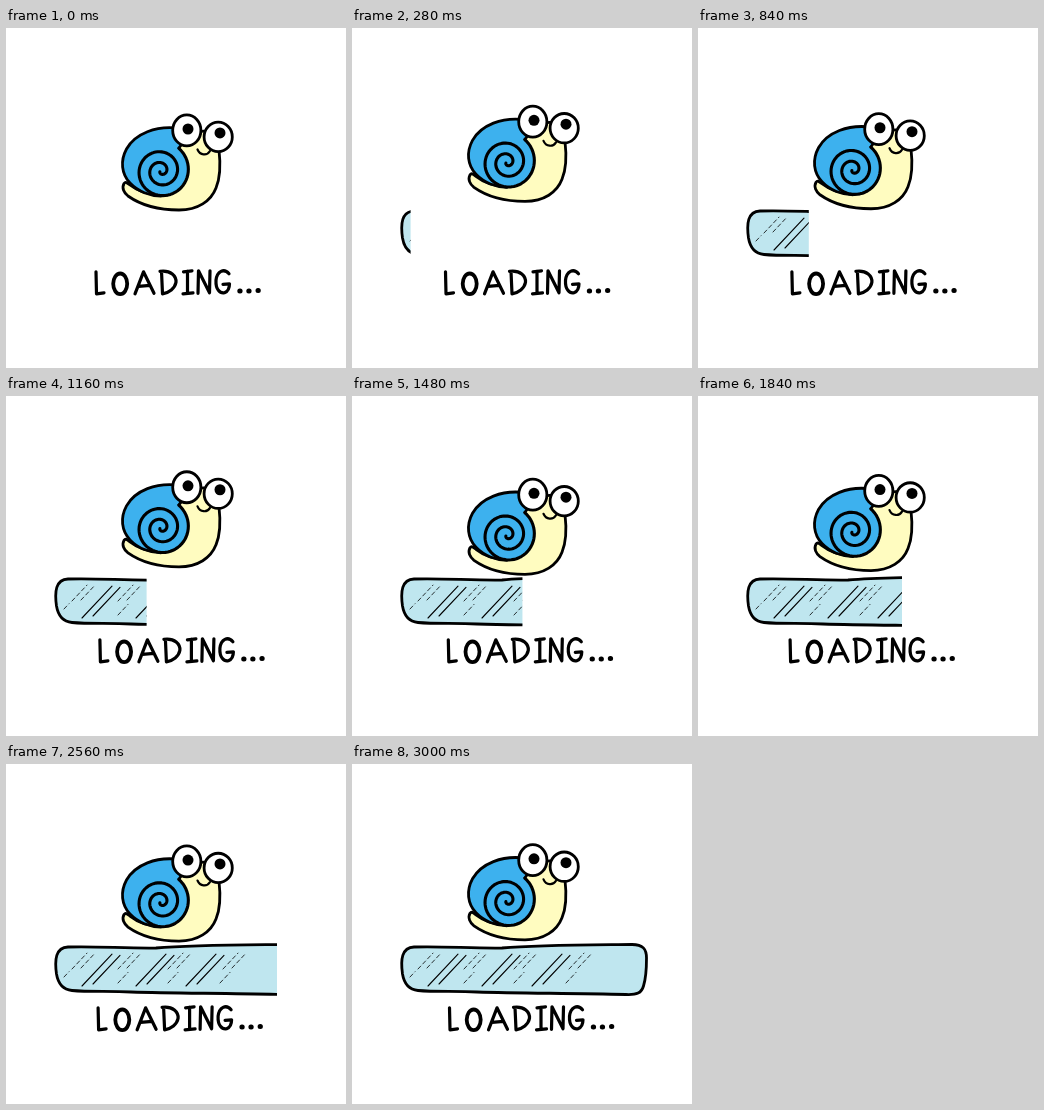
Write an HTML page that moves like this. It is 340x340 px and loops after 3040 ms.

```html
<!DOCTYPE html>
<html lang="en">
<head>
<meta charset="utf-8">
<title>Loading</title>
<style>
  html, body { margin: 0; width: 100%; height: 100%; overflow: hidden; background: #fff; }
  svg { display: block; width: 100vw; height: 100vh; }
  .ink { fill: none; stroke: #000; stroke-width: 2.8; stroke-linecap: round; stroke-linejoin: round; }
  .body { fill: #fffcc0; }
  .shell { fill: #3db1ee; }
  .eye { fill: #fff; }
  .glass { fill: #bfe6ef; }
  .fine { stroke-width: 1.1; }
  .dash { stroke-width: .8; stroke-dasharray: 4 3; }
  .word { stroke-width: 3.2; }
  .bold { stroke-width: 3.8; }
  .dots { stroke-width: 5; }
  .smile { stroke-width: 2.2; }
  #spiral { stroke-width: 3.1; }
</style>
</head>
<body>
<svg viewBox="0 0 340 340" role="img" aria-label="LOADING...">
  <defs>
    <clipPath id="reveal"><rect id="edge" y="170" width="0" height="70"/></clipPath>
  </defs>

  <g clip-path="url(#reveal)">
    <path class="ink glass" d="M62 183C90 182 120 184.500 150 184C185 181 235 181 280 180.500
      C291 180.500 294.500 185 294.500 194C294.500 204 294 214 291.500 222C289.500 229 285 231 274 230.500
      C220 229 170 229.500 125 228C103 227 82 228 66 226.500C56 225.500 52 219 50.500 210
      C48.500 196 49.500 183.500 62 183Z"/>
    <g id="shine"></g>
  </g>

  <g id="snail">
    <path class="ink body" d="M118 155.500C115.500 160 118 165 122 168C134 176.500 152 182 173 182
      C192 182 205 173 210 160C215 148 214.500 135 213 122L206 107C202 103 196 102 190 105L170 117
      L160 166C145 168 133 164 124 157C121 154.500 119.500 153.500 118 155.500Z"/>
    <path class="shell" d="M174 100.500C150 97 129 106 120.500 121C114 133 115.500 146 124 155
      C132 163.500 144 168 155 168C173 167 183 156 182 142C181.500 130 178 124 173 120L178 112Z"/>
    <path class="ink" d="M174 100.500C150 97 129 106 120.500 121C114 133 115.500 146 124 155
      C132 163.500 144 168 155 168M173 120L178 113"/>
    <path class="ink" id="spiral"/>
    <g id="eyes"></g>
    <path class="ink smile" d="M191.500 121.500C194 127.500 201 128 204 123"/>
  </g>

  <g id="word" class="ink word">
    <path d="M90 243.500L90.500 265.500L98 264.500"/>
    <ellipse class="bold" cx="114.200" cy="255.500" rx="7" ry="10.300"/>
    <path d="M129 265.500L137.500 243.500L148 265M132.500 258L144 257"/>
    <path d="M155.500 243L156.500 265.500M154 243C165 241.500 170.500 248 170 254C169 260 163 264.500 156.500 265.500"/>
    <path d="M181.500 243V265M177.500 243.500L186 242.500M177 265.500L187 264.500"/>
    <path d="M192 265L192.500 242.500L203.500 264.500L204 242.500"/>
    <path d="M223 245.500C218 239.500 211 243 210 252C209.500 261 214 265.500 218.500 264.500
      C222.500 263 223.500 259 223.500 255.500L217 256"/>
    <path class="dots" d="M233.800 262.700h.3M242.800 262.700h.3M252 262.300h.3"/>
  </g>
</svg>

<script>
const LOOP = 3040, STEP = 40;
const el = id => document.getElementById(id);

function add(parent, tag, attrs) {
  const node = document.createElementNS("http://www.w3.org/2000/svg", tag);
  for (const key in attrs) node.setAttribute(key, attrs[key]);
  parent.append(node);
}

function drawSpiral() {
  const points = [];
  for (let deg = -52; deg <= 870; deg += 6) {
    const r = 27.3 - 2.7 * deg / 90, a = deg * Math.PI / 180;
    points.push(`${(155 + r * Math.cos(a)).toFixed(2)} ${(143 + r * Math.sin(a)).toFixed(2)}`);
  }
  el("spiral").setAttribute("d", "M" + points.join("L"));
}

function drawEye(x, y, ry, px, py) {
  add(el("eyes"), "ellipse", { class: "ink eye", cx: x, cy: y, rx: 14.1, ry });
  add(el("eyes"), "circle", { cx: px, cy: py, r: 5.5 });
}

// Diagonal glints; each rises from the lower left.
function glint(kind, x, y, run) {
  add(el("shine"), "path", { class: "ink " + kind, d: `M${x} ${y}l${run} ${-run * 1.06}` });
}

function drawShine() {
  for (const x of [76, 130, 180]) {
    glint("fine", x, 222, 30);
    glint("fine", x + 11, 220, 27);
  }
  glint("dash", 58, 213, 5);
  for (const x of [66, 112, 162, 217]) {
    glint("dash", x, 205, 15);
    glint("dash", x + 9, 204, 14);
  }
  for (const x of [112, 162, 214]) glint("dash", x, 219, 10);
}

// Triangle wave: 0 at the start, 1 half a period later.
function swing(t, period) {
  const p = (t % period) / period;
  return 1 - Math.abs(2 * p - 1);
}

function wordShift(t) {
  return t < 600 ? 7.5 * t / 600 : 7.5 - 6 * swing(t - 600, 800);
}

function render(now) {
  const t = Math.floor((now % LOOP) / STEP) * STEP;
  el("edge").setAttribute("width", 32.5 + 0.0932 * t);
  el("snail").setAttribute("transform", `translate(0 ${-12.4 * swing(t, 800)})`);
  el("word").setAttribute("transform", `translate(${wordShift(t)} 0.3)`);
}

drawSpiral();
drawEye(180.8, 102.4, 15.5, 182, 101);
drawEye(212.2, 108.9, 14.7, 214, 104.9);
drawShine();

const start = performance.now();
function tick() {
  render(performance.now() - start);
  requestAnimationFrame(tick);
}
tick();
</script>
</body>
</html>
```
